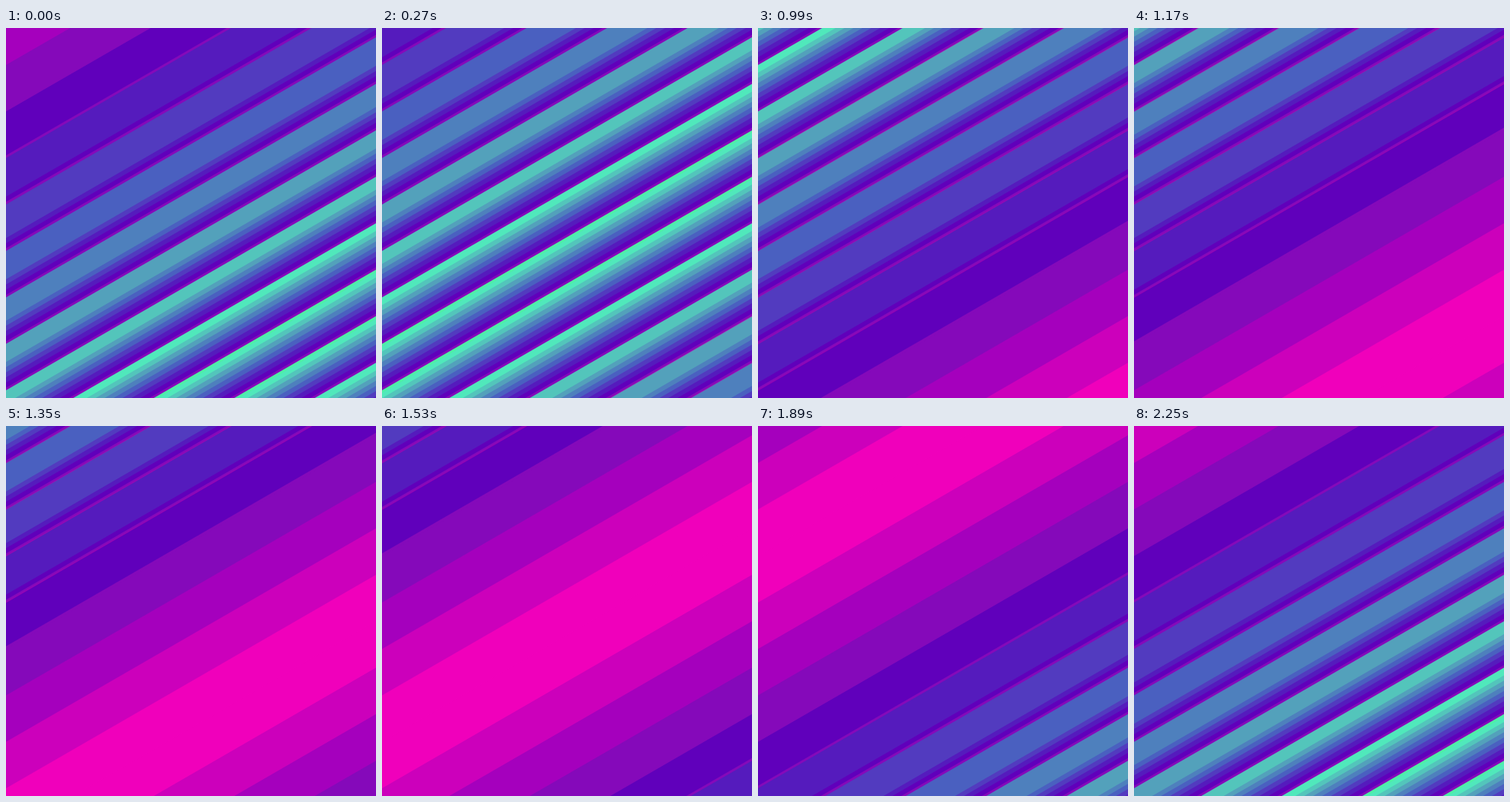
Recreate the animation shown at these times as an HTML page with a canvas. Size 480x480 px, loop 2.34 s.

```html
<!DOCTYPE html>
<html lang="en">
<head>
<meta charset="utf-8">
<title>Diagonal stripes</title>
<style>
  html, body { margin: 0; width: 100%; height: 100%; overflow: hidden; }
  canvas { display: block; }
</style>
</head>
<body>
<canvas width="480" height="480"></canvas>
<script>
const ctx = document.querySelector('canvas').getContext('2d');
const colors = [
  '#f000bb', '#cc00bb', '#a500bd', '#8509ba', '#6000bb', '#551bbd', '#523bbf',
  '#4a60c0', '#4e80bd', '#53a1bb', '#53c5bb', '#50e8bb', '#4ef0a5'
];
const STEP = 90, PHASES = 26, STRIPS = 13, FLOOR = 3;
const WIDTH = 480 * Math.SQRT2 / STRIPS;
const FIRST_EDGE = 41.6;

// Each fill reaches past the far corner; later strips cover the rest.
function fillFrom(y, color, height = 900) {
  ctx.fillStyle = color;
  ctx.fillRect(-400, y, 1200, height);
}

// A strip is a stepped ramp, capped at a level that rises and falls.
function drawStrip(top, phase) {
  const level = Math.floor(Math.abs((phase + 2.5) % PHASES - 13));
  const cap = 12 - level;
  const n = phase === 23 || phase === 24 ? 0 : cap;
  fillFrom(top, colors[n]);
  for (let v = n - 1; v >= FLOOR; v--) {
    fillFrom(top + WIDTH * (1 - (v - FLOOR + 0.5) / 9), colors[v]);
  }
}

function levelOf(phase) {
  return 12 - Math.floor(Math.abs(phase - 10.5) <= 13
    ? Math.abs(phase - 10.5) : PHASES - Math.abs(phase - 10.5));
}

function drawStripes(frame) {
  ctx.setTransform(1, 0, 0, 1, 0, 0);
  ctx.rotate(-Math.PI / 6);
  for (let s = 0; s < STRIPS; s++) {
    const phase = (s + frame) % PHASES;
    const top = FIRST_EDGE + WIDTH * (s - 1);
    const n = levelOf(phase);
    fillFrom(top, colors[n]);
    for (let v = n - 1; v >= FLOOR; v--) {
      fillFrom(top + WIDTH * (1 - (v - FLOOR + 0.5) / 9), colors[v]);
    }
  }
  // Faint pink seams below the falling strips.
  for (let s = 0; s < STRIPS; s++) {
    const phase = (s + frame) % PHASES;
    if (phase > 12 && phase < 19) {
      fillFrom(FIRST_EDGE + WIDTH * s - 0.5, 'rgba(190, 0, 170, 0.45)', 1);
    }
  }
}

function tick(now) {
  drawStripes(Math.floor(now / STEP) % PHASES);
  requestAnimationFrame(tick);
}
tick(performance.now());
</script>
</body>
</html>
```
